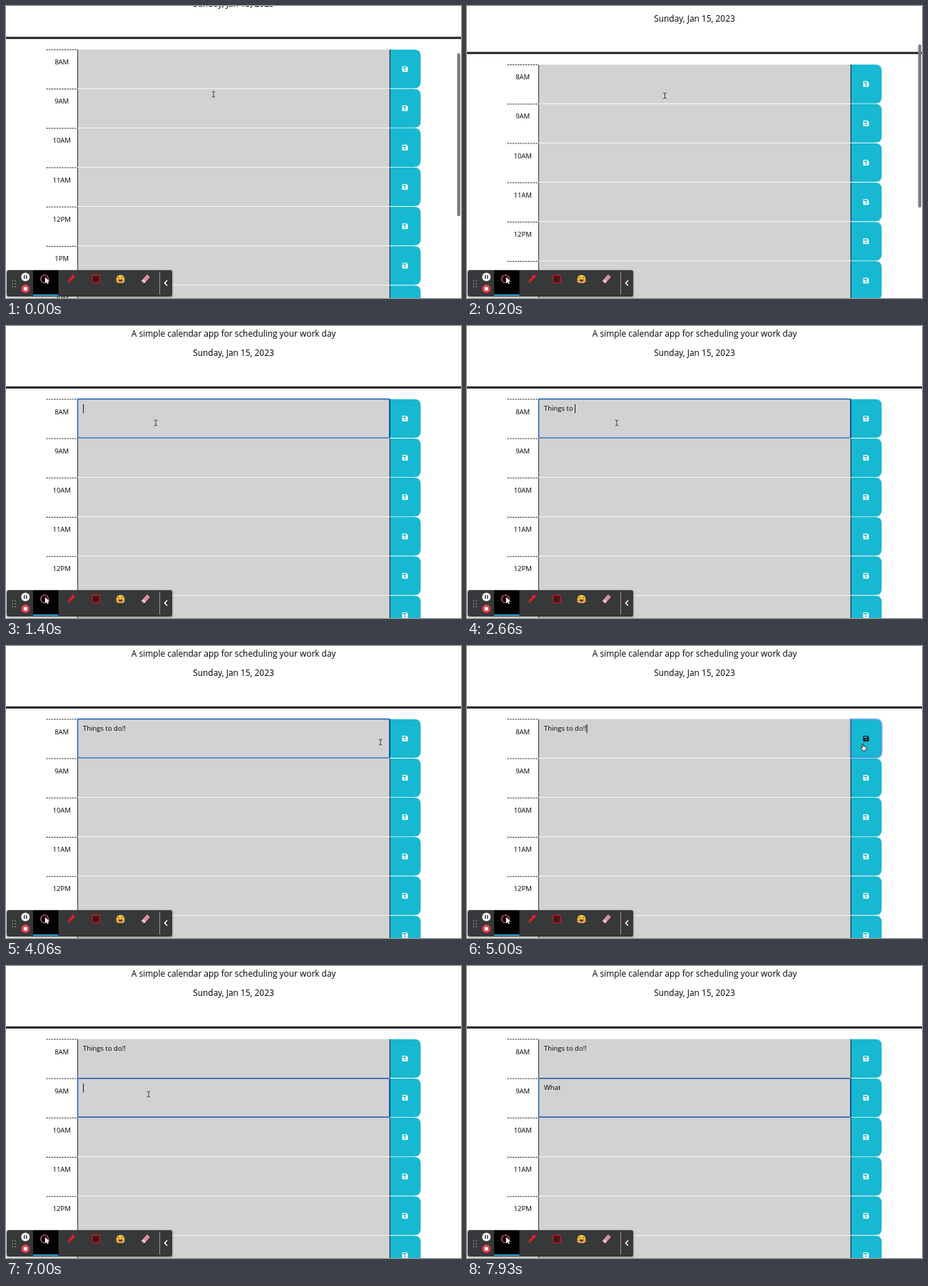
Recreate the animation shown at these times as an HTML page. Size 638 px wide and 410 px high, loop 8 s.

```html
<!DOCTYPE html>
<html lang="en">
<head>
<meta charset="utf-8">
<title>Work day scheduler</title>
<style>
  html, body { margin: 0; width: 100%; height: 100%; overflow: hidden; background: #fff; }
  svg { display: block; width: 638px; height: 410px; }
  text { font-family: "Open Sans", sans-serif; font-size: 9.5px; fill: #000; white-space: pre; }
  .head { font-size: 11.9px; text-anchor: middle; }
  .hour { text-anchor: middle; }
  .tool { font-size: 5.7px; font-weight: 700; fill: #fff; text-anchor: middle; }
</style>
</head>
<body>
<svg viewBox="0 0 638 410">
  <defs>
    <path id="floppy" fill-rule="evenodd" d="M1 0H6L8 2V7Q8 8 7 8H1Q0 8 0 7V1Q0 0 1 0ZM1.2 1.2V3.2H5.6V1.2ZM4 4.3A1.2 1.2 0 1 0 4 6.7A1.2 1.2 0 1 0 4 4.3Z"/>
    <path id="button" d="M538 0H572.5Q581.5 0 581.5 9V45.3Q581.5 54.3 572.5 54.3H538Z"/>
  </defs>

  <g id="page">
    <text class="head" x="319.2" y="15.2">A simple calendar app for scheduling your work day</text>
    <text class="head" x="319" y="42.3">Sunday, Jan 15, 2023</text>
    <rect y="84.8" width="638" height="3" fill="#212024"/>
    <g id="rows"></g>
    <use id="glow" href="#button" y="102.7" fill="none" stroke="#4b83e6" stroke-opacity=".42" stroke-width="3"/>
    <rect id="focus" x="100.5" width="437.2" height="54.6" rx="1" fill="none" stroke="#1459b5" stroke-width="1.4"/>
    <rect id="caret" width=".9" height="12.6"/>
  </g>

  <rect id="thumb" x="632.6" width="4.4" height="229" rx="2.2" fill="#7d7d7d"/>

  <g id="toolbar">
    <rect x="0" y="370" width="234.5" height="40" rx="4" fill="#000" opacity=".18"/>
    <rect x="1" y="371" width="232" height="37" rx="3" fill="#373839"/>
    <rect x="38" y="371" width="35.5" height="36" fill="#000"/>
    <rect x="38" y="405" width="35.5" height="2" fill="#35a3d5"/>
    <path d="M9.3 386V395M13 386V395" stroke="#aaa" stroke-width="1.7" stroke-linecap="round" stroke-dasharray="0 4"/>
    <circle cx="27.2" cy="380.4" r="6" fill="#f4f4f4"/>
    <path d="M25.7 377.8V383M28.7 377.8V383" stroke="#333" stroke-width="1.4"/>
    <circle cx="27.2" cy="397" r="6" fill="#dc3e4e"/>
    <rect x="24.8" y="394.6" width="4.8" height="4.8" rx=".6" fill="#fff"/>

    <circle cx="54" cy="383.3" r="5.4" fill="none" stroke="#df6170" stroke-width="1.3"/>
    <path d="M54.8 380.6V389.4L56.9 387.5L58.3 390.4L59.8 389.7L58.4 386.9H61.2Z" fill="#fff"/>

    <g transform="translate(90.8 383.5) rotate(42)" fill="#e32030">
      <rect x="-1.9" y="-7" width="3.8" height="9.4" rx=".8"/>
      <path d="M-1.9 3H1.9L.7 6.3H-.7Z"/>
      <rect x="-1.9" y="-2.2" width="3.8" height=".8" fill="#9f1420"/>
    </g>
    <rect x="120.6" y="378.2" width="10.4" height="10.4" fill="#451519" stroke="#cf1822" stroke-width="1.3"/>
    <circle cx="160.5" cy="383.3" r="5.8" fill="#fbc63c"/>
    <path d="M156.7 382Q158 380.2 159.3 382M161.7 382Q163 380.2 164.3 382" fill="none" stroke="#63411a" stroke-width=".9"/>
    <path d="M157.2 384H163.8Q163 387.6 160.5 387.6T157.2 384Z" fill="#6b3a1e"/>
    <path d="M155.3 386.5L157.8 388.3M165.7 386.5L163.2 388.3" stroke="#eda22c" stroke-width="2" stroke-linecap="round"/>
    <g transform="translate(195.8 383.3) rotate(42)">
      <rect x="-2.7" y="-6.2" width="5.4" height="8.2" rx=".6" fill="#db8e9b"/>
      <rect x="-2.7" y="2" width="5.4" height="4" rx=".8" fill="#f1c1c7"/>
    </g>
    <path d="M215.6 373V405" stroke="#a5a5a5" stroke-width=".9"/>
    <path d="M226 385.2L222.5 389L226 392.8" fill="none" stroke="#fff" stroke-width="1.5"/>
  </g>

  <circle id="ring" r="18.6" fill="none" stroke="#e2636e" stroke-width="2.6"/>
  <g id="beam" fill="none" stroke-linecap="round">
    <path d="M-2-4Q0-4 0-3Q0-4 2-4M0-3V3M-2 4Q0 4 0 3Q0 4 2 4" stroke="#fff" stroke-opacity=".7" stroke-width="1.8"/>
    <path d="M-2-4Q0-4 0-3Q0-4 2-4M0-3V3M-2 4Q0 4 0 3Q0 4 2 4" stroke="#111" stroke-width=".9"/>
  </g>
  <path id="hand" d="M-1.8 1V-3.8Q-1.8-4.7-1-4.7T-.2-3.8V-1.2Q.8-1.9 1.4-.9Q2.3-1.5 2.8-.5Q4-.8 4 .6V2.2L2.9 5H-1.2L-3.8 1.6Q-4.2.3-3 .3Z" fill="#fff" stroke="#111" stroke-width=".9" stroke-linejoin="round"/>
</svg>

<script>
const LOOP = 8000, TOP = 102.7, PITCH = 55.2, SCROLL = 41.5;
const $ = id => document.getElementById(id);
const rowY = i => TOP + i * PITCH;

$('rows').innerHTML = ['8AM', '9AM', '10AM', '11AM', '12PM', '1PM', '2PM'].map((hour, i) => `
  <g transform="translate(0 ${rowY(i)})">
    <path d="M56.5 .2H100" stroke="#111" stroke-width=".9" stroke-dasharray="2.4 1.2"/>
    <text class="hour" x="78.2" y="20.9">${hour}</text>
    <rect x="100" width="438" height="54.3" fill="#d2d2d2"/>
    <path d="M100.5 0V54.6" stroke="#222" stroke-width=".9"/>
    <use href="#button" fill="#17b8d1"/>
    <path d="M538.3 0V54.3" stroke="#123" stroke-width="1.1"/>
    <use id="icon${i}" href="#floppy" x="555.5" y="23.2" fill="#fff"/>
    <text id="note${i}" x="108" y="16.6"></text>
  </g>`).join('');

// Keystroke times, one per character
const notes = [
  { text: 'Things to do!!', keys: [2000, 2070, 2140, 2210, 2280, 2360, 2440, 2510, 2590, 2660, 2800, 2860, 3130, 3260] },
  { text: 'What', keys: [7200, 7260, 7330, 7400] }
];
const pointer = [
  [60, 291, 124], [600, 239, 131], [860, 222, 134], [1130, 210, 136], [3660, 210, 136],
  [4060, 525, 135], [4330, 556, 142], [5060, 556, 142], [5460, 222, 176], [5600, 216, 178], [5730, 200, 180]
];
const clicks = [[1130, 1400], [4530, 4860], [5930, 6260]];
const focuses = [[1270, 4530, 0], [5930, LOOP, 1]];
const caretOff = [[1800, 2000], [3760, 4260], [6600, 7000], [7930, LOOP]];

const clamp = v => Math.min(1, Math.max(0, v));
const ramp = (t, a, b) => clamp((t - a) / (b - a));
const during = t => ([a, b]) => t >= a && t < b;
const show = (id, on) => $(id).setAttribute('opacity', Number(on));
const move = (id, x, y) => $(id).setAttribute('transform', `translate(${x} ${y})`);

function pointerAt(t) {
  const i = pointer.findIndex(p => p[0] > t);
  if (i === 0) return pointer[0].slice(1);
  if (i < 0) return pointer.at(-1).slice(1);
  const [a, b] = [pointer[i - 1], pointer[i]];
  const k = ramp(t, a[0], b[0]);
  return [a[1] + (b[1] - a[1]) * k, a[2] + (b[2] - a[2]) * k];
}

function draw(t) {
  const left = (1 - ramp(t, 60, 530)) ** 2;
  move('page', 0, -SCROLL * left);
  $('thumb').setAttribute('y', 42.3 + 24 * left);
  show('thumb', 1 - ramp(t, 1030, 1330));

  notes.forEach(({ text, keys }, i) => {
    $('note' + i).textContent = text.slice(0, keys.filter(k => k <= t).length);
  });

  const active = focuses.find(during(t));
  show('focus', !!active);
  show('caret', active && !caretOff.some(during(t)));
  if (active) {
    const row = active[2];
    $('focus').setAttribute('y', rowY(row) - .2);
    $('caret').setAttribute('x', 108 + $('note' + row).getComputedTextLength());
    $('caret').setAttribute('y', rowY(row) + 7);
  }

  const [x, y] = pointerAt(t);
  const hover = x > 538;
  const visible = t < 7200;
  show('beam', visible && !hover);
  show('hand', visible && hover);
  ['beam', 'hand', 'ring'].forEach(id => move(id, x, y));
  $('icon0').setAttribute('fill', hover ? '#111' : '#fff');
  show('glow', ramp(t, 4530, 4680) * (1 - ramp(t, 6000, 6130)));

  const click = clicks.find(during(t));
  show('ring', click ? 1 - ramp(t, click[1] - 130, click[1]) : 0);
  if (click) $('ring').setAttribute('r', 12 + 6.6 * ramp(t, click[0], click[0] + 60));
}

function tick(now) {
  draw(now % LOOP);
  requestAnimationFrame(tick);
}
draw(0);
requestAnimationFrame(tick);
</script>
</body>
</html>
```
